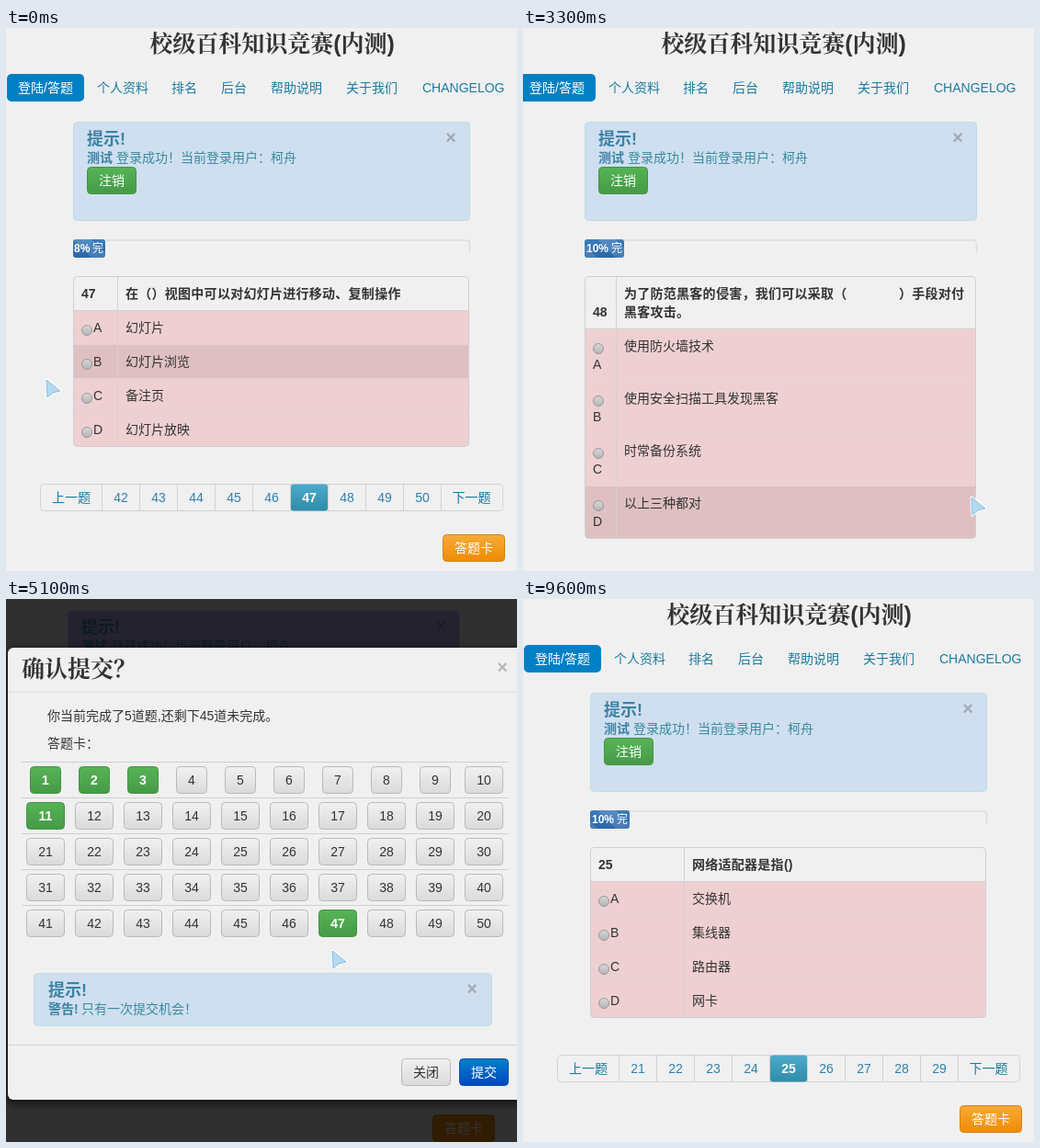
Animation, 556 px wide and 591 px high, one loop 9900 ms. Source, as an HTML page:

```html
<!DOCTYPE html>
<html lang="zh-CN">
<head>
<meta charset="utf-8">
<style>
html, body { margin: 0; width: 100%; height: 100%; overflow: hidden; background: #f0f0f0; }
svg { display: block; width: 556px; height: 591px; }
text { font: 14px "Liberation Sans", Arial, "Noto Sans CJK SC", sans-serif; fill: #333; white-space: pre; }
.b { font-weight: bold; }
.q { font-weight: bold; letter-spacing: .27px; }
.h { font: bold 25px "Liberation Sans", Arial, "Noto Serif CJK SC", "Noto Sans CJK SC", serif; }
.t { font-size: 18px; font-weight: bold; }
.x { font-size: 20px; font-weight: bold; }
.s { font-size: 12px; }
.m { text-anchor: middle; }
</style>
</head>
<body>
<svg id="stage" viewBox="0 0 556 591"></svg>
<script>
const STEP = 300, LOOP = 9900;
const LINK = '#1c7ba0', INFO = '#3c82a4', PINK = '#efd0d2', LINE = '#d2d2d2';

const gradients = {
  green: ['#55b455', '#479a47'], cyan: ['#4caccb', '#2f8ca8'], orange: ['#f7ab38', '#f08a04'],
  gray: ['#f1f1f1', '#dadada'], blue: ['#0082c8', '#0046c0'], bar: ['#3c7cbc', '#2a67a8'],
  radio: ['#d8d8d8', '#b4b4b4']
};
const defs = Object.entries(gradients).map(([id, [a, b]]) =>
  `<linearGradient id="${id}" x2="0" y2="1"><stop stop-color="${a}"/><stop offset="1" stop-color="${b}"/></linearGradient>`
).join('') + '<filter id="blur" x="-10%" y="-10%" width="120%" height="120%"><feGaussianBlur stdDeviation="4"/></filter>';

const text = (x, y, s, cls = '', fill = '#333') =>
  `<text x="${x}" y="${y}" class="${cls}" style="fill:${fill}">${s}</text>`;
const rect = (x, y, w, h, fill, r = 0, more = '') =>
  `<rect x="${x}" y="${y}" width="${w}" height="${h}" rx="${r}" fill="${fill}" ${more}/>`;
const box = (x, y, w, h, fill, stroke, r = 4) =>
  rect(x + .5, y + .5, w - 1, h - 1, fill, r, `stroke="${stroke}"`);
const line = (x1, y1, x2, y2, color = LINE) =>
  `<path d="M${x1} ${y1}L${x2} ${y2}" stroke="${color}"/>`;
const button = (x, y, w, label, fill, stroke, color = '#fff', cls = 'm') =>
  box(x, y, w, 30, fill, stroke) + text(x + w / 2, y + 20, label, cls, color);
const close = (x, y) => text(x, y, '×', 'm x', 'rgba(0,0,0,.24)');

// Each question: page geometry, wording and pager state
const scenes = [
  { num: 47, left: 73, right: 505, col: 121.5, pager: 37, first: 42, done: [], percent: 8,
    title: [[130, '在（）视图中可以对幻灯片进行移动、复制操作']],
    options: ['幻灯片', '幻灯片浏览', '备注页', '幻灯片放映'] },
  { num: 48, left: 67, right: 494, col: 101.5, pager: 28, first: 42, done: [47], percent: 10, tall: true,
    title: [[110, '为了防范黑客的侵害，我们可以采取（'], [409, '）手段对付'], [110, '黑客攻击。', 20]],
    options: ['使用防火墙技术', '使用安全扫描工具发现黑客', '时常备份系统', '以上三种都对'] },
  { num: 25, left: 73, right: 505, col: 175.5, pager: 37, first: 21, done: [], percent: 10,
    title: [[184, '网络适配器是指()']],
    options: ['交换机', '集线器', '路由器', '网卡'] }
];

// Cursor way points: step, x, y
const path = [[0, 43, 382], [2, 86, 364], [3, 86, 364], [7, 505, 508], [8, 487, 510], [11, 487, 510],
  [14, 494, 567], [15, 494, 567], [17, 354, 382], [19, 247, 281], [24, 247, 281], [25, 250, 292],
  [26, 262, 470], [28, 265, 567], [29, 265, 600], [33, 265, 600]];

function cursorAt(step) {
  const i = path.findIndex(p => p[0] > step);
  const [s0, x0, y0] = path[i - 1], [s1, x1, y1] = path[i];
  const k = (step - s0) / (s1 - s0);
  return [Math.round(x0 + (x1 - x0) * k), Math.round(y0 + (y1 - y0) * k)];
}

function header(dx) {
  const items = [[99, '个人资料'], [180, '排名'], [234, '后台'], [288, '帮助说明'], [370, '关于我们'], [453, 'CHANGELOG']];
  return `<g transform="translate(${dx})">` + text(289.5, 26, '校级百科知识竞赛(内测)', 'h m') +
    rect(1, 50, 84, 30, '#0080c4', 5) + text(13, 70, '登陆/答题', '', '#fff') +
    items.map(([x, s]) => text(x, 70, s, '', LINK)).join('') + '</g>';
}

function notice({ left, right }, dim) {
  const fill = dim > .5 ? '#bcaaf0' : dim ? '#cdecee' : '#cfdfef', x = left + 15;
  return box(left, 102, right - left, 108, fill, '#bcdde6') + text(x, 127, '提示!', 't', INFO) +
    text(x, 146, '测试', 'b', INFO) + text(x + 32, 146, '登录成功！当前登录用户：柯舟', '', '#388a9e') +
    close(right - 21, 126) + button(x, 151, 54, '注销', 'url(#green)', '#429442');
}

function progress({ left, right, percent }, step) {
  const w = Math.round((right - left) * percent / 100);
  const shift = left + 40 - step * 6 % 40;
  return `<pattern id="stripes" width="40" height="40" patternUnits="userSpaceOnUse" patternTransform="translate(${shift} 230)">
    <path d="M0 40V20L20 40zM0 0H20L40 20V40z" fill="#fff" opacity=".13"/></pattern>` +
    `<path d="M${left} 231H${right - 4}q3 0 3.5 4v10" fill="none" stroke="#dedede" stroke-width="1.6"/>` +
    rect(left, 230, w, 20, 'url(#bar)', 3) + rect(left, 230, w, 20, 'url(#stripes)', 3) +
    text(left + (percent < 10 ? 1 : 2), 244, percent + '%', 'b s', '#fff') +
    text(left + (percent < 10 ? 21 : 29), 244, '完', 's', '#fff');
}

function radio(x, y, on) {
  return `<circle cx="${x}" cy="${y}" r="5.5" fill="url(#radio)" stroke="#999"/>` +
    (on ? `<circle cx="${x}" cy="${y}" r="2.8" fill="#333"/>` : '');
}

function table({ num, left, right, col, tall, title, options }, hover, checked) {
  const h = tall ? 57 : 37, end = right - 1, top = 270 + h;
  let out = text(left + 9, tall ? 314 : 294, num, 'b') +
    title.map(([x, s, dy = 0]) => text(x, 294 + dy, s, 'q')).join('');
  options.forEach((s, i) => {
    const y = top + i * h;
    out += rect(left + 1, y, end - left - 2, h, i === hover ? '#dfc0c2' : PINK) +
      line(left + 1, y + .5, end - 1, y + .5, i ? '#e4d2d6' : LINE) +
      radio(left + 15, y + 22, i === checked) +
      text(left + (tall ? 9 : 22), y + (tall ? 44 : 24), 'ABCD'[i]) + text(col + 8.5, y + 24, s);
  });
  return out + line(col, 271, col, top + 4 * h - 1, '#d8cfd1') +
    box(left, 270, end - left, h * 5 + 1, 'none', '#cfcfcf');
}

function pager({ pager: x, first, num, done }, y, nextHover) {
  let out = box(x, y, 504, 30, '#f0f0f0', LINE);
  if (nextHover) out += rect(x + 437, y + 1, 66, 28, '#ededed', 3);
  for (let i = 0; i < 9; i++) {
    const n = first + i, cx = x + 67.5 + i * 41;
    const fill = n === num ? 'url(#cyan)' : done.includes(n) ? 'url(#green)' : '';
    out += line(cx, y + 1, cx, y + 29);
    if (fill) out += rect(cx + .5, y + .5, 40, 29, fill, 3);
    out += text(cx + 20.5, y + 20, n, fill ? 'm b' : 'm', fill ? '#fff' : '#3080ab');
  }
  return out + line(x + 436.5, y + 1, x + 436.5, y + 29) + text(x + 34, y + 20, '上一题', 'm', LINK) +
    text(x + 469.5, y + 20, '下一题', 'm', nextHover ? '#0a5068' : LINK);
}

function dialog(cx, cy) {
  let out = rect(0, 54, 564, 496, '#000', 6, 'opacity=".55" filter="url(#blur)"') +
    rect(2, 53, 560, 492, '#f0f0f0', 6) + text(17, 85, '确认提交？', 'h') + close(540, 81) +
    line(2, 101.5, 556, 101.5, '#e0e0e0') +
    text(45, 132, '你当前完成了5道题,还剩下45道未完成。') + text(45, 162, '答题卡：');
  for (let n = 1; n <= 50; n++) {
    const c = (n - 1) % 10, r = (n - 1 - c) / 10, w = n < 10 ? 34 : 42;
    const x = 43 + c * 53 - w / 2, y = 182 + r * 39;
    const over = cx >= x && cx < x + w && cy >= y && cy < y + 30;
    if (!c) out += line(17, y - 4.5, 547, y - 4.5, '#d0d0d0');
    out += [1, 2, 3, 11, 47].includes(n)
      ? button(x, y, w, n, 'url(#green)', '#429442', '#fff', 'm b')
      : button(x, y, w, n, over ? '#dadada' : 'url(#gray)', '#bababa', '#333');
  }
  return out + box(30, 407, 499, 58, '#cfdfef', '#bcdde6') + text(46, 432, '提示!', 't', INFO) +
    text(46, 451, '警告!', 'b', INFO) + text(82, 451, '只有一次提交机会！', '', '#388a9e') + close(507, 431) +
    line(2, 485.5, 556, 485.5, '#d6d6d6') +
    button(430, 500, 54, '关闭', 'url(#gray)', '#bababa', '#333') +
    button(493, 500, 54, '提交', 'url(#blue)', '#0050b0');
}

function draw(step) {
  const scene = scenes[step < 10 ? 0 : step < 22 ? 1 : 2];
  const scroll = step >= 12 && step < 22 ? 90 : 0;
  const modal = step >= 16 && step < 22;
  const dim = modal ? .8 : step === 15 ? .34 : 0;
  const [cx, cy] = cursorAt(step);

  const rowH = scene.tall ? 57 : 37;
  const inTable = !dim && cx > scene.left && cx < scene.right;
  const hover = step < 4 ? 1 : inTable && step < 22 ? Math.floor((cy + scroll - 270) / rowH) - 1 : -1;
  const grow = scene.tall ? 100 : 0;
  const bx = scene.right + (scene.tall ? -30 : -30), by = 551 + grow;
  const overCard = scroll && step >= 13;

  stage.innerHTML = `<defs>${defs}</defs>` + rect(0, 0, 556, 591, '#f0f0f0') +
    `<g transform="translate(0 ${-scroll})">` + header(scene.left - 73) + notice(scene, dim) + progress(scene, step) +
    table(scene, hover, step >= 3 && step < 10 ? 1 : -1) + pager(scene, 496 + grow, step >= 7 && step < 10) +
    button(bx, by, 68, '答题卡', overCard ? '#f08c04' : 'url(#orange)', '#d08418') + '</g>' +
    (dim ? rect(0, 0, 556, 591, '#000', 0, `opacity="${dim}"`) : '') + (modal ? dialog(cx, cy) : '') +
    `<path transform="translate(${cx} ${cy})" d="M1 1L16 13L8 15L2 20z" fill="#a9d6f2" stroke="#fff" stroke-width="3" stroke-linejoin="round"/>` +
    `<path transform="translate(${cx} ${cy})" d="M1 1L16 13L8 15L2 20z" fill="#b4daf2" stroke="#84bce4" stroke-linejoin="round"/>`;
}

const stage = document.getElementById('stage');
let shown = -1;
function tick() {
  let step = Math.floor(performance.now() % LOOP / STEP);
  if (step > 22 && step < 25) step = 22; // the new question rests
  if (step !== shown) draw(shown = step);
  requestAnimationFrame(tick);
}
tick();
</script>
</body>
</html>
```
